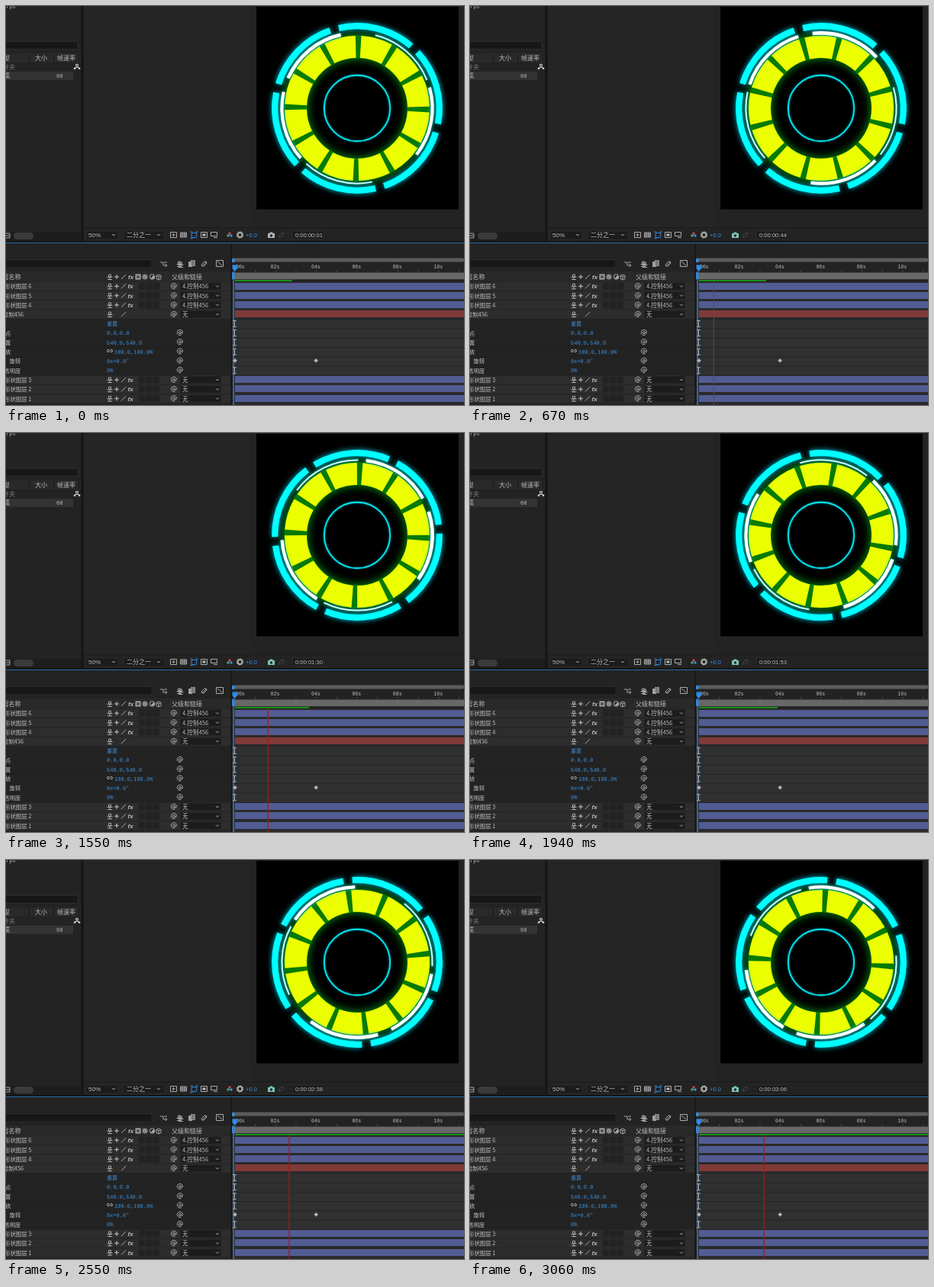
These frames come from a looping animation (600x523 px, 3110 ms). An HTML page:

```html
<!DOCTYPE html>
<html>
<head>
<meta charset="utf-8">
<style>
html, body { margin: 0; width: 100%; height: 100%; overflow: hidden; background: #232323; }
svg { display: block; }
text { font-family: "Noto Sans CJK SC", "Noto Sans CJK", sans-serif; font-size: 8px; fill: #bdbdbd; white-space: pre; }
.mono { font-family: "Liberation Mono", monospace; font-size: 7px; }
.sans { font-family: "Liberation Sans", sans-serif; }
.blue { fill: #3b8fe0; }
.dim { fill: #777; }
.icon { fill: none; stroke: #a8a8a8; stroke-width: 1; }
</style>
</head>
<body>
<svg id="stage" width="600" height="523" viewBox="0 0 600 523"></svg>
<script>
const LOOP = 3110, STEPS = 61, STEP = LOOP / STEPS;
const parts = [];
const add = s => parts.push(s);
const rect = (x, y, w, h, fill, more = '') =>
  add(`<rect x="${x}" y="${y}" width="${w}" height="${h}" fill="${fill}" ${more}/>`);
const text = (x, y, s, cls = '', more = '') => add(`<text x="${x}" y="${y}" class="${cls}" ${more}>${s}</text>`);
const icon = (d, more = '') => add(`<path class="icon" d="${d}" ${more}/>`);
const chevron = (x, y) => icon(`M${x - 2} ${y - 1}l2 2l2 -2`);
const swirl = (x, y) => icon(`M${x + 1.5} ${y}a1.5 1.5 0 1 1 -3 0a1.5 1.5 0 0 1 3 0v1q2 .5 2 -1.500a3.600 3.600 0 1 0 -2 3.500`, 'stroke-width=".9"');
const box = (x, y, w, h) => rect(x, y, w, h, '#1c1c1c', 'stroke="#303030" stroke-width=".7"');
const person = (x, y) => icon(`M${x - 1.5} ${y - 3}h3v3h-3zM${x - 3.5} ${y + .5}h7M${x} ${y}v4M${x - 3} ${y + 3.5}h6`);
const sun = (x, y) => icon(`M${x - 3} ${y}h6M${x} ${y - 3}v6M${x - 1.5} ${y}l1.5 -1.500l1.500 1.500l-1.500 1.500z`, 'stroke-width=".8"');
const slash = (x, y) => icon(`M${x - 3} ${y + 3}l6 -6`);
const fx = (x, y) => text(x - 4, y + 3, 'fx', 'sans', 'font-style="italic" font-weight="bold"');

function projectPanel() {
  text(0, 3, 'fps', 'mono');
  rect(-2, 46.5, 96, 10, '#171717', 'stroke="#2c2c2c"');
  rect(0, 62, 98, 12, '#292929');
  text(-3, 71, '型');
  text(38, 71, '大小');
  text(67, 71, '帧速率');
  for (const x of [30, 62, 95]) rect(x, 63, 1, 10, '#171717');
  text(-4, 83, '件夹', 'dim');
  icon('M91.500 76.500h3v2h-3zM93 78.500v2M90 82.500v-2h6v2M89 81.500h2v1h-2zM95 81.500h2v1h-2z', 'style="stroke:#c8c8c8"');
  rect(0, 86, 88, 11, '#333');
  text(-3, 94, '成');
  text(66, 94, '60', 'mono');
  rect(0, 296, 98, 12, '#1d1d1d');
  icon('M-1 298h6v6h-6zM0 301h5');
  rect(10, 297, 26, 9, '#3a3a3a', 'rx="4.500"');
  rect(98.5, 0, 3, 308, '#151515');
}

function viewerFooter() {
  rect(102, 290, 498, 1, '#1b1b1b');
  box(105, 295, 42, 11);
  text(108, 303, '50%', 'sans');
  chevron(141, 300);
  box(154, 295, 53, 11);
  text(158, 303, '二分之一');
  chevron(200, 300);
  icon('M215.500 296.500h8v7h-8zM219.500 298v4M217.500 300h4');
  icon('M228.500 297h8v6h-8zM228.500 299h8M228.500 301h8M231 297v6M234 297v6', 'stroke-width=".7"');
  icon('M243 297.500h7l-1 6h-6zM241.500 296h3M248.500 296h3M241.500 304.500h3', 'style="stroke:#2f87d8"');
  icon('M255.500 296.500h8v7h-8z');
  rect(257.5, 298.5, 4, 3, '#b8b8b8');
  icon('M268.500 296.500h8v5h-8zM272 303.500h5');
  [['#c44', 293, 298], ['#4a6', 291, 301], ['#48d', 295, 301]].forEach(([c, x, y]) => add(`<circle cx="${x}" cy="${y}" r="1.700" fill="${c}"/>`));
  add('<circle cx="306.500" cy="300" r="3" fill="none" stroke="#aaa" stroke-width="2"/><circle cx="306.500" cy="300" r="4.300" fill="none" stroke="#aaa" stroke-dasharray="1.700 1.700"/>');
  text(314, 303, '+0.0', 'sans blue', 'style="font-size:7.500px"');
  add('<path id="camera" d="M343 298h2l1 -1.500h3l1 1.500h2v6h-9zM347.500 299.300a1.700 1.700 0 1 0 .01 0z" fill-rule="evenodd"/>');
  icon('M357 303l2 -4l4 -2l1 3l-4 3z', 'style="stroke:#444"');
  rect(374.5, 295, 42, 10.5, '#1d1d1d', 'stroke="#303030" stroke-width=".7"');
  add('<text id="code" x="379" y="303" class="sans" style="font-size:7.600px"></text>');
}

// Ring sector; angles in degrees, clockwise from the top.
function arc(r, width, from, span, color) {
  const point = deg => {
    const a = deg * Math.PI / 180;
    return `${(r * Math.sin(a)).toFixed(3)} ${(-r * Math.cos(a)).toFixed(3)}`;
  };
  return `<path d="M${point(from)}A${r} ${r} 0 0 1 ${point(from + span)}" fill="none" stroke="${color}" stroke-width="${width}"/>`;
}

function dashRing(r, width, count, gap, color) {
  const step = 360 / count;
  return Array.from({ length: count }, (_, i) => arc(r, width, i * step + gap / 2, step - gap, color)).join('');
}

function gauge() {
  rect(328, 1, 265, 265.5, '#000');
  // [centre angle, stroke width] of the five arcs
  const arcs = [[41, 2], [101, 4.2], [195.5, 2], [255.5, 4.2], [320.5, 4.6]];
  add(`<g transform="translate(460 134)" fill="none">
    <circle r="81" stroke="#0a8a14" stroke-width="36" style="filter:blur(5px)" opacity=".75"/>
    <circle r="80.500" stroke="#067a06" stroke-width="30"/>
    <g id="blocks">${dashRing(80.6, 29, 12, 4.6, '#ecff00')}</g>
    <g style="filter:drop-shadow(0 0 3.500px #00c0d8)"><g id="outer">${dashRing(107.8, 8.2, 6, 6.2, '#00ffff')}</g></g>
    <g style="filter:drop-shadow(0 0 2px #00c8d8)"><g id="arcs">${arcs.map(([c, w]) => arc(98.6, w, c - 27, 54, w < 3 ? '#c8ffff' : '#fff')).join('')}</g></g>
    <circle r="43.200" stroke="#00e6f0" stroke-width="1.900" style="filter:drop-shadow(0 0 1.500px #008a98)"/>
  </g>`);
}

function timelineHead() {
  rect(0, 308, 600, 2, '#151515');
  rect(0, 310, 600, 1, '#2a6ca8');
  rect(-2, 332.5, 193, 10.5, '#171717', 'stroke="#2c2c2c"');
  icon('M202 336h4v4h5M207 336h4M209 338l2 2l-2 2');
  person(227, 338);
  person(229, 339);
  rect(239, 335, 5, 7, '#a0a0a0');
  rect(242.5, 333.5, 5, 7, '#777', 'stroke="#aaa" stroke-width=".7"');
  icon('M256 339l4 -4q3 -1 3 2l-4 4q-3 1 -3 -2zM258 340l4 -4');
  icon('M275.500 333.500h9v8h-9zM277 335l6 5');
  rect(0, 348, 295, 13, '#292929');
  text(-4.5, 358, '层名称');
  const y = 355;
  person(136, y); sun(145, y); slash(154, y); fx(164, y);
  rect(169.5, 351.5, 7, 7, '#aaa');
  rect(171, 353, 4, 4, '#555');
  add(`<circle cx="182" cy="${y}" r="3.500" fill="#888"/><circle cx="191.500" cy="${y}" r="3.300" fill="none" stroke="#aaa"/><path d="M189 357.500l5 -5v5z" fill="#aaa"/>`);
  icon('M197 353.500l3 -1.500l3 1.500v4l-3 1.500l-3 -1.500zM197 353.500l3 1.500l3 -1.500M200 355v3.500');
  text(217, 358, '父级和链接');
}

const ROW = 12.27;
const rowY = i => 367.3 + ROW * i;

function layerRow(i, name, parent, color, control) {
  const y = rowY(i);
  rect(0, y - 5.6, 294, 11.4, '#2d2d2e');
  text(control ? -4 : -2, y + 3, name, '', 'style="font-size:7.400px"');
  person(136, y);
  slash(154, y);
  if (!control) {
    sun(145, y);
    fx(163.5, y);
    for (const x of [173.5, 183, 192.5]) rect(x, y - 4.5, 8.5, 9, '#222223');
  }
  swirl(220, y);
  box(228, y - 5, 54, 10);
  text(231, y + 3, parent, '', 'style="font-size:7.600px"');
  chevron(277, y);
  rect(300, Math.round(y - 4.8), 300, 9, color);
}

function propertyRow(i, name, value, x, nameX) {
  const y = rowY(i);
  text(nameX, y + 3, name, '', 'style="font-size:7.400px"');
  text(x, y + 2.7, value, /\d/.test(value) ? 'mono blue' : 'blue', 'style="font-size:7px"');
  rect(0, y + 5.8, 295, .7, '#1f1f1f');
  if (i > 4) swirl(228, y - .5);
}

function tracks() {
  rect(294.5, 311, 1.5, 212, '#141414');
  rect(296, 361, 304, 162, '#2a2a2a');
  rect(296, rowY(3.5), 304, ROW * 6, '#303030');
  for (let i = 4; i < 11; i++) rect(296, rowY(i - .5), 304, 1, '#252525');
}

function ruler() {
  rect(296, 330.5, 304, 5, '#5c5c5c', 'rx="2"');
  rect(296, 331, 3.5, 5, '#2d8ceb', 'rx="1"');
  rect(296, 349.5, 304, 9, '#686868');
  rect(296, 349, 3.5, 9, '#2d8ceb', 'rx="1"');
  rect(296, 358.5, 304, 2.5, '#202020');
  for (let i = 0; i < 6; i++) text(i ? 346.5 + 53.45 * (i - 1) : 297, 344, i ? String(i * 2).padStart(2, '0') + 's' : ':00s', 'mono', 'style="font-size:6.600px"');
  for (let i = 0; i < 12; i++) rect(299.5 + i * 26.7, 346, .7, 3, '#555');
  add('<rect id="cache" x="300" y="359" height="1.700" fill="#14a014"/>');
}

function build() {
  rect(0, 0, 600, 523, '#232323');
  projectPanel();
  rect(102, 0, 218, 290, '#252525');
  viewerFooter();
  gauge();
  timelineHead();
  tracks();
  ruler();
  const violet = '#525c93';
  [6, 5, 4].forEach((n, i) => layerRow(i, '形状图层 ' + n, '4.控制456', violet));
  layerRow(3, '控制456', '无', '#803a38', true);
  [['', '重置', 132, 0], ['点', '0.0,0.0', 132, -1], ['置', '540.0,540.0', 132, -1], ['放', '100.0,100.0%', 142, -1],
   ['旋转', '0x+0.0°', 132, 4.5], ['透明度', '0%', 132, -3]]
    .forEach((p, i) => propertyRow(i + 4, ...p));
  icon('M135 450.500h-1a1.500 1.500 0 0 0 0 3h1M137 450.500h1a1.500 1.500 0 0 1 0 3h-1M134.500 452h3');
  [3, 2, 1].forEach((n, i) => layerRow(i + 10, '形状图层 ' + n, '无', violet));

  rect(297.5, 348, 1.4, 175, '#2d7fd0');
  add('<path d="M296.500 339.500h6.500v4.500l-3.200 4l-3.300 -4z" fill="#2d8ceb"/>');
  for (const i of [4, 5, 6, 7, 9]) {
    const y = rowY(i);
    icon(`M297 ${y - 4}h5M299.500 ${y - 4}v8M297 ${y + 4}h5`, 'stroke-width=".8"');
  }
  for (const x of [300, 406.2]) add(`<path d="M${x - 2.8} 464.800l2.800 -2.800l2.800 2.800l-2.800 2.800z" fill="#b5b5b5"/>`);
  add('<rect id="head" y="361" height="162"/>');
  document.getElementById('stage').innerHTML = parts.join('');
}

function along(keys, i) {
  let k = 1;
  while (k < keys.length - 1 && keys[k][0] < i) k++;
  const [a, va] = keys[k - 1], [b, vb] = keys[k];
  return va + (vb - va) * Math.min(1, (i - a) / (b - a));
}

const codeKeys = [[0, 1], [13, 44], [23, 70], [38, 113], [44, 142], [55, 172], [60, 186]];
const cacheKeys = [[0, 375], [13, 388], [23, 392], [38, 403], [42, 406]];

// The playhead flickers while it runs.
function headLook(i) {
  if (i === 0 || i % 16 === 6) return ['none', 0];
  if (i % 16 === 13) return ['#505050', 1];
  return i % 7 === 6 ? ['#ff0000', 1.8] : ['#b01414', 1.3];
}

build();
const nodes = Object.fromEntries(['outer', 'arcs', 'blocks', 'head', 'cache', 'camera', 'code']
  .map(id => [id, document.getElementById(id)]));
const set = (id, name, value) => nodes[id].setAttribute(name, value);
const turn = (id, deg) => set(id, 'transform', `rotate(${deg.toFixed(2)})`);
const two = v => String(v).padStart(2, '0');

function draw(i) {
  const s = i * STEP / 1000;
  turn('outer', -16 - 90.4 * s);
  turn('arcs', 90.4 * s);
  turn('blocks', 1 + 20.4 * s);
  const [color, width] = headLook(i);
  set('head', 'fill', color);
  set('head', 'width', width);
  set('head', 'x', (301.2 + 27.4 * s - width / 2).toFixed(2));
  set('cache', 'width', i >= 42 ? 300 : along(cacheKeys, i) - 300);
  set('camera', 'fill', i ? '#7ec4b4' : '#b4b4b4');
  const n = Math.round(along(codeKeys, i));
  nodes.code.textContent = `0:00:${two(Math.floor(n / 60))}:${two(n % 60)}`;
}

let shown = -1;
const origin = performance.now();
function tick() {
  const t = (performance.now() - origin) % LOOP;
  // Steps begin on whole 10 ms, so allow a little slack.
  const i = Math.min(STEPS - 1, Math.floor((t + 12) / STEP));
  if (i !== shown) draw(shown = i);
  requestAnimationFrame(tick);
}
tick();
</script>
</body>
</html>
```
